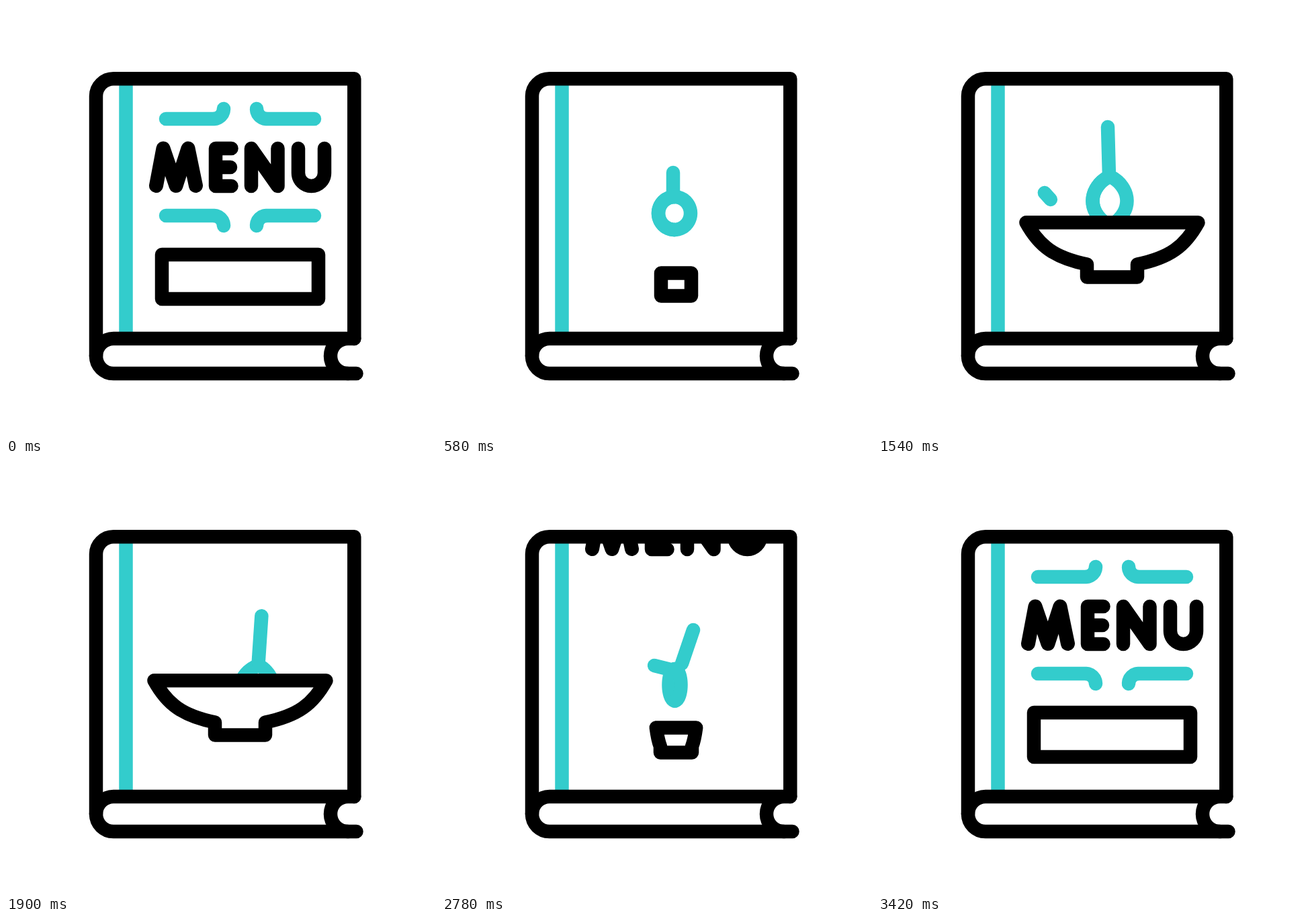
These frames come from a looping animation (640x640 px, 3.6 s). An HTML page:

```html
<!DOCTYPE html>
<html lang="en">
<head>
<meta charset="utf-8">
<title>Menu book</title>
<style>
  html, body { margin: 0; width: 100%; height: 100%; overflow: hidden; background: #fff; }
  svg { display: block; width: 100vw; height: 100vh; }
  path { fill: none; stroke: #000; stroke-width: 20.5; stroke-linecap: round; stroke-linejoin: round; }
  .teal path { stroke: #3cc; }
  #bowl { fill: #fff; }
</style>
</head>
<body>
<svg viewBox="0 0 640 640">
  <clipPath id="cover"><path d="M134 110H518V495H134Z"/></clipPath>
  <path d="M178.500 118V486" style="stroke:#3cc;stroke-linecap:butt"/>
  <g class="teal" id="drops"></g>
  <g class="teal" id="spoon"></g>
  <path id="bowl"/>
  <g clip-path="url(#cover)">
    <g id="word" role="img" aria-label="MENU">
      <path style="stroke-width:21" d="M223.500 267.500 234 212 253 267.500 271 212 282.500 267.500"/>
      <path d="M335.500 212H312V268H335.500M312 240H334"/>
      <path d="M365 268V212L404.500 268V212"/>
      <path d="M435 212V248.500a19.500 19.500 0 0 0 39 0V212"/>
    </g>
  </g>
  <path d="M518.300 495V108.300H160A26 26 0 0 0 134 134V521A26 26 0 0 0 160 547H521.500"/>
  <path d="M134 521A26 26 0 0 1 160 495H518.300M509 495a26 26 0 0 0 0 52"/>
</svg>
<script>
const LOOP = 3600, MID = 348.5, STEPS = 24;
const $ = id => document.getElementById(id);
const { sin, cos, PI } = Math;

// Eased 0 to 1 between two times
const ramp = (t, from, to) => {
  const p = Math.min(1, Math.max(0, (t - from) / (to - from)));
  return (1 - cos(PI * p)) / 2;
};
const mix = (a, b, p) => a.map(([x, y], i) => [x + (b[i][0] - x) * p, y + (b[i][1] - y) * p]);

// Cover shape -> small -> full -> folded -> cover shape
function morph(t, [rest, small, full, folded], foldEnd) {
  let pose = mix(rest, small, ramp(t, 40, 580));
  pose = mix(pose, full, ramp(t, 580, 1100));
  pose = mix(pose, folded, ramp(t, 2360, foldEnd));
  return mix(pose, rest, ramp(t, foldEnd, 3240));
}

const sample = f => Array.from({ length: STEPS + 1 }, (_, i) => f(i / STEPS));
const line = (x1, y1, x2, y2) => sample(u => [x1 + (x2 - x1) * u, y1 + (y2 - y1) * u]);

// Bar with a quarter turn at its inner end
const ornament = (sx, sy) => sample(u => {
  const turn = Math.max(0, (u - .75) * 2 * PI);
  const x = 39.5 + 71 * Math.max(0, 1 - u / .75) - 15 * sin(turn);
  const y = 72 + 15 * (1 - cos(turn));
  return [MID + sx * x, 240 + sy * y];
});

// Half of a closed loop; a higher power makes sharper tips
const half = (side, cx, top, bottom, width, power = 1) => sample(u => [
  cx + side * width * sin(PI * u) ** power,
  (top + bottom) / 2 - (bottom - top) / 2 * cos(PI * u)
]);

const ring = side => half(side, 346, 284, 333, 24);
const leaf = side => half(side, 345, 254, 326, 25.5, 1.5);
const bud = side => half(side, 346.5, 305, 352.5, 9);

const strokes = [
  [ornament(-1, -1), ring(-1), leaf(-1), line(316, 300, 340, 306)],
  [ornament(1, -1), line(344, 248, 344, 280), line(342, 180, 344, 253), line(374, 247, 357, 297)],
  [ornament(-1, 1), ring(-1), leaf(-1), bud(-1)],
  [ornament(1, 1), ring(1), leaf(1), bud(1)]
];

// Right half of the symmetric bowl, as offsets from the middle
const box = (w, top, bottom) => [0, .25, .5, .75, 1].map(p => [w, top + (bottom - top) * p]);
const tiny = box(22.5, 397.5, 431.5);
const bowl = [[128, 322.2], [108.5, 357.5], [86, 374.5], [37.5, 384.5], [37.5, 403.6]];
const bowlPoses = [box(116.5, 370, 436), tiny, bowl, tiny];

function bowlPath(pts) {
  const [A, c, d, P, Q] = pts.map(([x, y]) => [MID + x, y]);
  const [a, e, f, p, q] = pts.map(([x, y]) => [MID - x, y]);
  return `M${a}L${A}C${c} ${d} ${P}L${Q}L${q}L${p}C${f} ${e} ${a}Z`;
}

// Bits tossed out of the bowl
const drops = [
  { peak: 1540, x: 252.5, y: 283, dx: 4.5, dy: 5, drift: -20 },
  { peak: 2240, x: 418, y: 276.5, dx: 1, dy: -1.5, drift: 14 },
  { peak: 2240, x: 475.3, y: 276.5, dx: 4.7, dy: -1.5, drift: -12 }
];

const addPaths = (group, list) => list.map(() =>
  group.appendChild(document.createElementNS('http://www.w3.org/2000/svg', 'path')));
const strokeEls = addPaths($('spoon'), strokes);
const dropEls = addPaths($('drops'), drops);

function draw(t) {
  strokeEls.forEach((el, i) => el.setAttribute('d', 'M' + morph(t, strokes[i], 2780).join('L')));
  $('bowl').setAttribute('d', bowlPath(morph(t, bowlPoses, 2866)));

  const dip = ramp(t, 1540, 1880) * (1 - ramp(t, 2480, 2780));
  const sway = -dip * cos(2 * PI * (t - 2240) / 720);
  $('spoon').setAttribute('transform',
    `translate(${32 * sway} ${46 * dip}) rotate(${5.5 * sway} 344 253)`);

  const lift = ramp(t, 20, 560) - ramp(t, 2600, 3200);
  $('word').setAttribute('transform', `translate(0 ${-178 * lift})`);

  drops.forEach(({ peak, x, y, dx, dy, drift }, i) => {
    const p = (t - peak) / 180;
    const cx = x + drift * p, cy = y + 48 * p * p;
    dropEls[i].setAttribute('d', `M${cx - dx} ${cy - dy}L${cx + dx} ${cy + dy}`);
    dropEls[i].style.display = Math.abs(p) < 1 ? '' : 'none';
  });
}

const start = performance.now();
function tick() {
  draw((performance.now() - start) % LOOP);
  requestAnimationFrame(tick);
}
tick();
</script>
</body>
</html>
```
